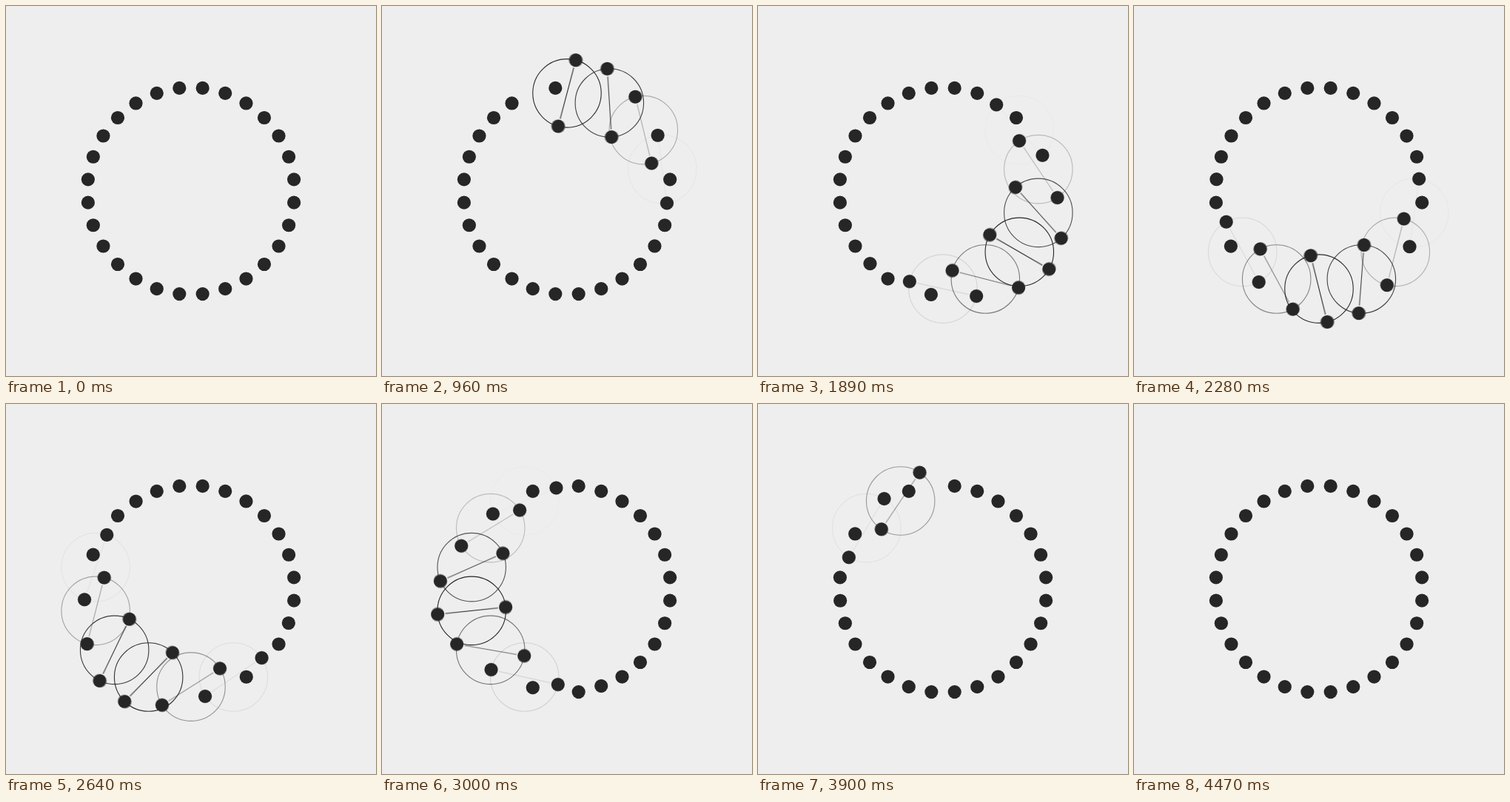
Animation, 500 px wide and 500 px high, one loop 5.17 s. Source, as an HTML page with a canvas:

```html
<!DOCTYPE html>
<html lang="en">
<head>
<meta charset="utf-8">
<title>Swapping dots</title>
<style>
  html, body { margin: 0; width: 100%; height: 100%; overflow: hidden; background: #eee; }
  canvas { display: block; width: 500px; height: 500px; }
</style>
</head>
<body>
<canvas id="stage" width="500" height="500"></canvas>
<script>
const SIZE = 500, BG = '#eeeeee', INK = '#262626';
const LOOP = 5170, STEP = 30, START = 60, LAST = 4470;
const PAIRS = 14, RING = 140, DOT = 9.1, GAP = 10.4;
const TURN = 1662, LAG = TURN / 8;
const SAMPLES = 8, SHUTTER = 15;

// Each pair spans three dot spacings and spins about its midpoint.
const HALF = 1.5 * Math.PI / PAIRS;
const MID = RING * Math.cos(HALF), ARM = RING * Math.sin(HALF);

const ctx = document.getElementById('stage').getContext('2d');
const layer = document.createElement('canvas');
layer.width = layer.height = SIZE;
const pen = layer.getContext('2d');

const clamp = x => Math.min(1, Math.max(0, x));
const ease = u => u - Math.sin(2 * Math.PI * u) / (2 * Math.PI);

function pairAt(k, time) {
  const u = clamp((time - START - k * LAG) / TURN);
  const a = 2 * Math.PI * k / PAIRS;
  const spin = a + Math.PI * ease(u);
  return {
    x: SIZE / 2 + MID * Math.sin(a),
    y: SIZE / 2 - MID * Math.cos(a),
    dx: Math.cos(spin),
    dy: Math.sin(spin),
    glow: Math.pow(Math.sin(Math.PI * u), 5)
  };
}

function disc(x, y) {
  pen.beginPath();
  pen.arc(x, y, DOT, 0, 2 * Math.PI);
  pen.fill();
}

function drawScene(time) {
  const pairs = Array.from({ length: PAIRS }, (_, k) => pairAt(k, time));
  pen.globalAlpha = 1;
  pen.fillStyle = BG;
  pen.fillRect(0, 0, SIZE, SIZE);
  pen.fillStyle = pen.strokeStyle = INK;
  pen.lineWidth = 1.1;

  for (const { x, y, dx, dy, glow } of pairs) {
    if (glow < 0.004) continue;
    const r = ARM - GAP;
    pen.globalAlpha = glow;
    pen.beginPath();
    pen.arc(x, y, ARM, 0, 2 * Math.PI);
    pen.moveTo(x - r * dx, y - r * dy);
    pen.lineTo(x + r * dx, y + r * dy);
    pen.stroke();
  }

  pen.globalAlpha = 1;
  for (const { x, y, dx, dy } of pairs) {
    disc(x - ARM * dx, y - ARM * dy);
    disc(x + ARM * dx, y + ARM * dy);
  }
}

// Average several moments for a short motion blur.
function render(time) {
  for (let i = 0; i < SAMPLES; i++) {
    drawScene(time + SHUTTER * ((i + 0.5) / SAMPLES - 0.5));
    ctx.globalAlpha = 1 / (i + 1);
    ctx.drawImage(layer, 0, 0);
  }
}

let origin = null, shown = -1;
function tick(now) {
  if (origin === null) origin = now;
  const t = (now - origin) % LOOP;
  const time = t < START ? 0 : Math.min(LAST, Math.floor(t / STEP) * STEP);
  if (time !== shown) {
    shown = time;
    render(time);
  }
  requestAnimationFrame(tick);
}
render(0);
requestAnimationFrame(tick);
</script>
</body>
</html>
```
